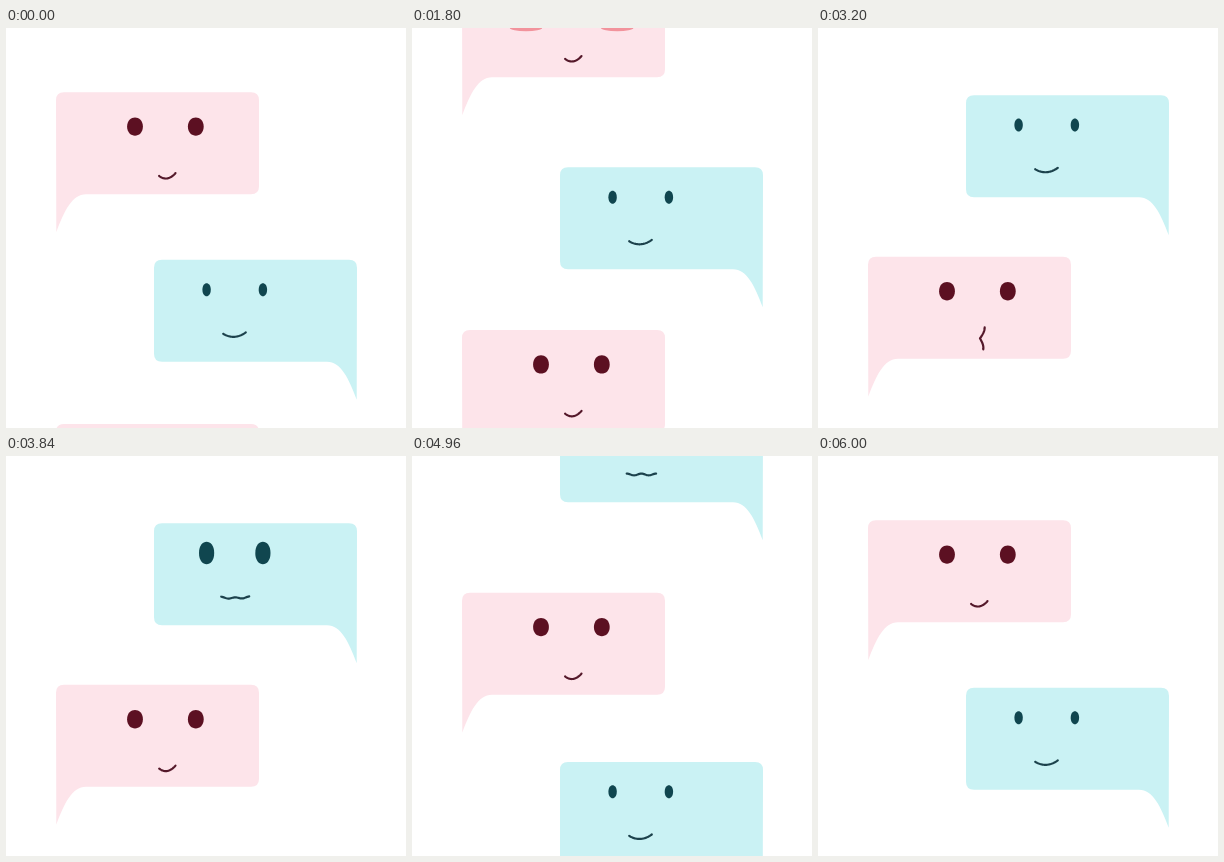
These frames come from a looping animation (400x400 px, 6.04 s). An HTML page:

```html
<!DOCTYPE html>
<html lang="en">
<head>
<meta charset="utf-8">
<title>Chatting bubbles</title>
<style>
  html, body { margin: 0; width: 100%; height: 100%; overflow: hidden; background: #fff; }
  svg { display: block; width: 100%; height: 100%; }
</style>
</head>
<body>
<svg id="stage" viewBox="0 0 400 400"></svg>
<script>
const LOOP = 6040;
const stage = document.getElementById('stage');
const BUBBLE = 'M50 8Q50 0 58 0H245Q253 0 253 8V94Q253 102 245 102H80C66 102 58 119 50.3 140Z';

const mix = (a, b, k) => a + (b - a) * k;
const span = (t, from, to) => Math.min(1, Math.max(0, (t - from) / (to - from)));
const smooth = k => k * k * (3 - 2 * k);

// Short ease in, long ease out: cubic-bezier(.2, 0, 0, 1)
function glide(x) {
  let lo = 0, hi = 1;
  for (let i = 0; i < 24; i++) {
    const s = (lo + hi) / 2;
    if (.6 * s * (1 - s) ** 2 + s ** 3 < x) lo = s; else hi = s;
  }
  return x >= 1 ? 1 : smooth(lo);
}

// Mouth shapes give a point for u from -1 (left) to 1 (right)
const smile = (x, y, w, sag, tilt) => u => [x + w * u, y + sag * (1 - u * u) - tilt * u];
const wave = u => [229.4 + 14.7 * u, 73.4 + 1.7 * Math.sin(Math.PI * u) ** 2];
const kiss = u => [162 + 4 * Math.sin(1.7 * Math.abs(u)) + .7 * u, 81.6 - 11 * u];
const pinkSmile = smile(161.3, 82.3, 8.2, 3.9, 1.4);
const blueSmile = smile(228.5, 73.3, 11.3, 3.7, .7);

function mouth(a, b, k, color) {
  const points = Array.from({ length: 33 }, (_, i) => {
    const u = i / 16 - 1, p = a(u), q = b(u);
    return [mix(p[0], q[0], k), mix(p[1], q[1], k)];
  });
  return `<polyline points="${points.join(' ')}" fill="none" stroke="${color}" stroke-width="2.2" stroke-linecap="round" stroke-linejoin="round"/>`;
}

// An ellipse that flattens into a thin upward arc as shut goes to 1
function eye(x, y, w, h, color, shut = 0) {
  const half = mix(w, 8.8, shut), end = y + 1.6 * shut;
  const top = end - mix(h * 4 / 3, 5.4, shut);
  const low = end + mix(h * 4 / 3, -2.2, shut);
  const l = x - half, r = x + half;
  return `<path d="M${l} ${end}C${l} ${top} ${r} ${top} ${r} ${end}C${r} ${low} ${l} ${low} ${l} ${end}Z" fill="${color}"/>`;
}

const bubble = (y, content) => `<g transform="translate(0 ${y})">${content}</g>`;

function pink(y, shut, pout) {
  const dark = '#5c1022';
  const cheek = x => `<ellipse cx="${x}" cy="52.7" rx="16.2" ry="3.4" fill="#f2939c" opacity="${shut}"/>`;
  return bubble(y, `<path d="${BUBBLE}" fill="#fde4ea"/>` +
    cheek(114) + cheek(205.2) +
    eye(129 - shut, 34.4, 7.9, 9.2, dark, shut) + eye(189.8 + shut, 34.4, 7.9, 9.2, dark, shut) +
    mouth(pinkSmile, kiss, pout, '#54182a'));
}

function blue(y, shock) {
  const dark = '#10464f', w = mix(4.2, 8.5, shock), h = mix(6.5, 12.5, shock);
  return bubble(y, `<path d="${BUBBLE}" transform="matrix(-1 0 0 1 401 0)" fill="#caf2f4"/>` +
    eye(200.6, 29.9, w, h, dark) + eye(256.9, 29.9, w, h, dark) +
    mouth(blueSmile, wave, shock, '#1c424c'));
}

function draw(now) {
  const t = now % LOOP;
  const up1 = glide(span(t, 1600, 2485));
  const up2 = glide(span(t, 4760, 5650));
  const shut = glide(span(t, 20, 860));
  const pout = smooth(span(t, 2860, 3180)) - smooth(span(t, 3480, 3860));
  const shock = smooth(span(t, 3480, 3990));
  stage.innerHTML =
    pink(mix(64.2, -144, up1), shut, 0) +
    blue(mix(mix(231.8, 67.2, up1), -152.6, up2), shock) +
    pink(mix(mix(396, 228.8, up1), 64.2, up2), 0, pout) +
    blue(mix(400, 231.8, up2), 0);
  requestAnimationFrame(() => draw(performance.now() - start));
}

const start = performance.now();
draw(0);
</script>
</body>
</html>
```
